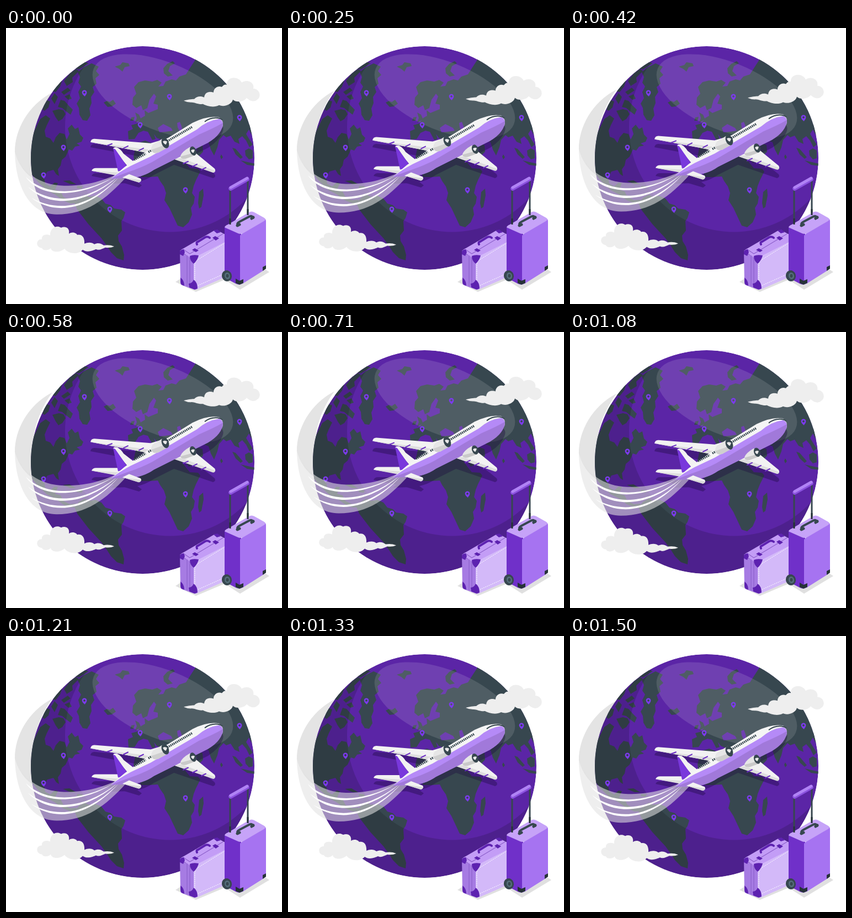
An HTML page for the animation above (1540 ms loop, 500x500 px).

```html
<!DOCTYPE html>
<html lang="en">
<head>
<meta charset="utf-8">
<title>Flight around the globe</title>
<style>
html, body { margin: 0; width: 100%; height: 100%; overflow: hidden; background: #fff; }
svg { display: block; width: 100vw; height: 100vh; }
</style>
</head>
<body>
<svg viewBox="0 0 500 500">
<defs>
  <clipPath id="ball"><circle cx="247.5" cy="235.5" r="202.5"/></clipPath>
  <path id="pin" fill-rule="evenodd" d="M.8 6C-2 3.6-4.4 1.6-4.4-1.4C-4.4-4-2.4-5.6 0-5.6C2.6-5.6 4.4-3.8 4.4-1.2C4.4 1.6 2.4 3.4.8 6ZM0-3A1.9 1.9 0 1 0 .01-3Z"/>
  <g id="outline">
    <path d="M190 273L215 252L255 223L338 172Q366 158 386 163Q397 168 392 180Q386 195 366 208L268 257Q248 271 222 272Z"/>
    <path d="M153 207Q154 201 160 201L262 209L296 199V212L268 229L238 223Z"/>
    <path d="M302 238L338 224L378 256Q381 261 375 263Z"/>
    <path d="M155 259Q157 254 163 254L216 254L246 276L241 280L208 270Z"/>
  </g>
</defs>

<path class="float" fill="#e4e4e4" d="M84 117C40 140 16 184 16 225C22 246 35 266 52 274C42 212 50 164 84 117Z"/>

<g clip-path="url(#ball)">
  <circle cx="247.5" cy="235.5" r="202.5" fill="#5b25a6"/>
  <g fill="#37474f">
    <!-- North America -->
    <path d="M40 214L52 185L62 165L72 158L80 164L74 176L70 186L72 197L80 200L86 208L90 198L97 190L106 192L110 202L115 192L112 182L119 175L125 183L131 180L134 193L140 199L137 206L128 209L134 213L125 215L120 222L114 220L108 233L101 239L99 249L94 256L96 268L91 265L86 257L75 260L69 270L71 282L80 287L88 280L94 281L89 293L99 296L104 306L116 312L127 311L129 317L117 318L103 312L88 301L74 294L58 279L44 262Z"/>
    <path d="M66 148L72 130L80 133L77 144L70 150ZM82 128L88 118L94 125L88 138ZM94 143L99 130L106 132L114 141L121 148L117 157L109 151L102 145ZM82 114L94 98L102 94L98 106L90 116ZM100 116L112 108L117 113L105 121ZM105 96L116 82L127 74L132 78L120 90L121 98L110 105ZM84 150L96 147L104 149L108 156L102 165L95 169L90 162ZM106 124L115 120L119 128L113 130ZM122 72L140 61L150 64L132 75Z"/>
    <path d="M103 277L115 276L127 283L117 283ZM129 286L139 287L137 291L128 290Z"/>
    <!-- Greenland, Iceland, Svalbard -->
    <path d="M130 80L141 71L155 64L168 70L163 78L169 85L162 91L164 101L157 107L160 116L154 125L155 136L151 146L153 158L147 168L139 167L133 157L132 145L128 137L134 127L131 116L136 106L131 99L134 89Z"/>
    <path d="M177 135L183 132L188 134L194 130L199 137L192 142L184 143Z"/>
    <path d="M197 70L207 67L211 62L222 64L224 69L215 71L211 79L205 74Z"/>
    <!-- South America -->
    <path d="M124 317L133 307L143 302L150 306L162 304L173 309L180 318L190 321L196 327L209 329L216 334L213 344L209 350L210 367L203 376L204 386L210 396L214 411L213 421L201 417L190 406L183 395L173 381L160 367L149 355L139 342L129 329Z"/>
    <!-- Europe and Asia -->
    <path d="M232 107L240 98L252 95L265 97L274 94L282 99L276 106L285 105L289 97L300 93L308 95L314 88L326 84L333 73L344 56L360 60L425 125L456 185L446 195L440 184L435 192L441 202L447 211L441 216L435 204L428 196L421 201L423 210L414 206L407 195L399 198L394 194L386 203L383 216L377 231L371 220L367 207L357 203L348 199L344 208L356 212L357 224L344 238L331 244L322 230L311 213L302 200L285 204L273 199L268 192L271 201L265 203L257 188L249 186L240 190L233 201L222 202L221 187L230 183L227 176L238 173L245 163L252 159L251 149L258 154L265 151L275 147L275 139L267 137L272 124L268 119L260 130L256 145L248 149L245 140L236 145L229 139L230 126L236 119Z"/>
    <path d="M286 82L285 73L292 65L302 60L306 64L297 69L294 78L302 86L293 88ZM234 153L241 157L245 166L234 171L237 163ZM227 162L233 161L231 168L225 168Z"/>
    <!-- Africa -->
    <path d="M236 209L252 204L268 210L285 214L301 216L314 228L324 243L333 254L348 255L352 260L344 276L340 286L337 299L342 306L340 318L335 326L337 338L331 352L321 361L311 358L304 343L296 326L287 312L290 299L286 287L279 277L275 269L259 270L245 270L236 252L231 233Z"/>
    <path d="M350 297L357 291L358 303L354 324L350 327L348 317Z"/>
    <!-- South-east islands -->
    <path d="M410 217L416 219L429 234L425 237L416 229ZM425 240L438 243L452 246V250L437 248ZM433 222L440 218L447 222L447 236L440 238L434 231ZM390 229L393 234L390 238L388 233ZM437 177L443 174L446 183L441 184Z"/>
  </g>
  <path fill="#5b25a6" d="M275 181L285 174L299 181L302 186L289 188L278 189ZM310 172L315 170L318 178L320 187L315 188L311 180ZM330 207L340 213L347 222L341 221L333 214Z"/>
  <path fill="#000" opacity=".15" fill-rule="evenodd" d="M0 0H500V500H0ZM107 179.5A190 190 0 0 0 487 179.5A190 190 0 0 0 107 179.5Z"/>
  <ellipse cx="284" cy="124" rx="135" ry="62" transform="rotate(22 284 124)" fill="#fff" opacity=".12"/>
  <use href="#outline" y="9" fill="#1d0b3f" opacity=".38"/>
</g>

<g id="pins" fill="#7c3aed"></g>

<g class="float">
  <path fill="#e2e2e2" opacity=".57" d="M16 225C17 282 40 338 92 338C145 338 180 312 218 270L205 264C170 279 145 286 105 286C62 285 28 262 16 225Z"/>
  <g fill="#fff">
    <path d="M36 270C60 307 130 311 196 270C130 306 70 303 36 270Z"/>
    <path d="M40 288C75 325 142 324 202 270C140 319 82 319 40 288Z"/>
    <path d="M46 308C85 338 147 335 204 271C146 329 92 333 46 308Z"/>
  </g>
</g>

<g class="float">
  <!-- far wing -->
  <path fill="#f2f2f2" d="M153 207Q154 201 160 201L262 209L296 199V214L268 229L238 223Z"/>
  <path fill="#dedede" d="M153 207L240 218L268 222V229L238 223Z"/>
  <path stroke="#6a2bc4" stroke-width="2" stroke-linecap="round" d="M184 213L192 210M213 218L221 214M241 222L249 218"/>
  <!-- tail -->
  <path fill="#f2f2f2" d="M155 259Q157 254 163 254L216 254L226 264L203 267Z"/>
  <path fill="#dedede" d="M155 259L205 262L216 267L203 268Z"/>
  <path fill="#f2f2f2" d="M194 219Q195 215 202 217Q209 221 213 228L231 242L224 255Z"/>
  <path fill="#7938dc" d="M194 218L198 220L216 246L222 256L203 260Z"/>
  <!-- near wing -->
  <path fill="#f2f2f2" d="M302 237L339 223L378 255Q381 260 376 262Z"/>
  <path fill="#dedede" d="M302 237L318 236L379 259Q378 263 374 262Z"/>
  <path stroke="#6a2bc4" stroke-width="2" stroke-linecap="round" d="M321 246L330 242M338 251L346 247M354 257L362 253"/>
  <!-- fuselage -->
  <path fill="#f5f5f5" d="M190 273L215 252L255 223L338 172Q366 158 386 162Q395 167 392 180L268 250L222 270Z"/>
  <path fill="#b58af7" d="M190 273Q207 260 226 250L262 233L346 184Q364 168 386 165Q395 168 392 180Q386 195 366 208L268 257Q248 271 222 272Z"/>
  <path fill="#a179da" d="M190 273L222 261Q246 253 265 243L350 193Q380 180 393 172Q392 193 366 208L268 257Q248 271 222 272Z"/>
  <path fill="none" stroke="#37474f" stroke-width="2" d="M360 170Q369 163 380 163Q388 163 392 167"/>
  <path stroke="#37474f" stroke-width="4" stroke-dasharray="2 1.3" d="M232 239L253 228M258 225L338 179"/>
  <path fill="#f2f2f2" d="M211 271L223 265L244 273Q247 277 241 280Z"/>
  <path fill="#d9d9d9" d="M211 271L245 276Q244 280 240 280Z"/>
  <!-- engines -->
  <path fill="#e6e6e6" d="M263 220Q263 211 272 208L286 199L293 216L276 226Q265 230 263 220Z"/>
  <path fill="#cfcfcf" d="M263 221L291 211L293 217L276 226Q266 229 263 221Z"/>
  <ellipse cx="288.5" cy="208.5" rx="6.3" ry="10" transform="rotate(-22 288.5 208.5)" fill="#37474f"/>
  <path fill="#e8e8e8" d="M284 206Q287 203 292 206L290 211Q287 212 284 206Z"/>
  <path fill="#e6e6e6" d="M316 232Q319 224 333 216L343 231L326 237Q316 239 316 232Z"/>
  <path fill="#c9c9c9" d="M316 233L342 226V231L326 237Q317 238 316 233Z"/>
  <ellipse cx="339" cy="223" rx="5.6" ry="8.5" transform="rotate(-22 339 223)" fill="#37474f"/>
  <path fill="#e8e8e8" d="M335 222Q338 219 342 221L340 226Q337 227 335 222Z"/>
</g>

<g class="float" fill="#eee">
  <path d="M322 132C328 130 336 129 341 129C345 124 353 123 359 126C360 117 367 114 376 117C376 109 384 104 391 107C394 103 397 102 400 103C399 88 421 86 427 99C437 92 451 99 448 110C461 111 463 126 455 130C449 136 440 131 436 127C431 134 417 136 411 130C409 139 395 144 386 140C377 145 364 142 357 138C347 139 341 134 335 135Q328 135 322 132Z"/>
  <path d="M196 396C190 393 182 393 177 394C172 390 166 389 160 392C156 388 148 388 142 391C143 379 137 373 129 375C127 371 119 369 114 373C116 361 106 359 100 362C90 356 79 364 80 376C70 372 64 377 65 383C55 382 52 397 65 399C68 405 78 403 81 399C83 408 99 407 106 400C112 409 130 412 139 402C147 408 158 403 163 401C168 404 175 400 180 398Q190 399 196 396Z"/>
</g>

<g stroke-linejoin="round">
  <path fill="#e0e0e0" d="M307 460L318 453L455 428L477 442L424 474L396 456L344 478Z"/>
  <!-- small case -->
  <path fill="#a67be3" d="M315 406L333 414L341 420V474L319 466Q316 465 316 460Z"/>
  <path fill="#d3b9f9" d="M340 416L390 378H400V450L345 474Q340 475 340 470Z"/>
  <path fill="#c39df6" d="M315 404Q317 401 322 399L377 367Q381 365 386 368L400 376V386L341 416Q336 418 331 414Z"/>
  <path fill="none" stroke="#8e62cc" stroke-width="1.2" d="M321 401L333 409L393 373M328 412V468M333 416V469"/>
  <path fill="none" stroke="#fff" stroke-dasharray="2 1.5" d="M397 389L347 420Q342 424 342 430V469L396 445"/>
  <g fill="#5d22b0">
    <path d="M315 405Q317 401 322 401L324 406L321 413L315 410ZM333 413Q339 410 349 412Q347 421 340 427Q333 422 333 413ZM316 452Q323 457 323 467L318 465Q316 463 316 460ZM331 463Q337 463 340 456Q347 461 347 472L342 474L332 470ZM376 367L383 365L389 370L382 372Z"/>
    <path d="M337 402L342 399L349 403L344 406ZM374 380L379 377L386 381L380 385Z"/>
  </g>
  <path fill="none" stroke="#5d22b0" stroke-width="4" stroke-linecap="round" d="M346 392Q344 388 348 387L361 379Q365 377 369 380"/>
  <!-- big case -->
  <path fill="none" stroke="#37474f" stroke-width="3" d="M406 290V357M438 274V340"/>
  <path fill="#7030c9" d="M396 361L426 371V464Q421 466 416 463L399 454Q396 452 396 448Z"/>
  <path fill="#a673f1" d="M424 376L458 345H468Q471 346 471 350V432Q471 436 467 439L429 463Q424 466 424 461Z"/>
  <path fill="#c6a3f8" d="M396 361Q397 358 402 356L440 334Q445 331 450 334L468 344Q472 347 467 350L431 371Q425 375 418 371L400 363Q397 362 396 361Z"/>
  <path fill="none" stroke="#263238" stroke-width="3" d="M406 345V356M438 328V339"/>
  <path fill="none" stroke="#37474f" stroke-width="4" stroke-linecap="round" d="M420 358Q417 354 423 351L440 342Q445 339 448 344"/>
  <path stroke="#37474f" stroke-width="5" stroke-linecap="round" d="M419 358L423 356M445 345L448 343"/>
  <path stroke="#8b52df" stroke-width="7.5" stroke-linecap="round" d="M407 291L437 274"/>
  <path stroke="#b083f5" stroke-width="5" stroke-linecap="round" d="M407 289L437 272"/>
  <path fill="#263238" d="M416 454L423 458L430 455V462L423 465L416 462ZM465 433L471 430V436L465 440Z"/>
  <ellipse cx="400" cy="449" rx="9" ry="10" transform="rotate(-18 400 449)" fill="#37474f"/>
  <ellipse cx="401" cy="449" rx="5" ry="6" transform="rotate(-18 401 449)" fill="#546e7a"/>
  <ellipse cx="401" cy="449" rx="2.5" ry="3.2" fill="#37474f"/>
</g>
</svg>
<script>
const LOOP = 1540, STEPS = 37, RISE = 10, LEAD = 40;
const floats = document.querySelectorAll('.float');
const spots = [[142, 118], [296, 125], [104, 217], [68, 267], [188, 329], [325, 294], [243, 176], [423, 163]];

document.getElementById('pins').innerHTML = spots
  .map(([x, y]) => `<use href="#pin" x="${x}" y="${y}"/>`).join('');

// Triangle wave: steady rise, then steady fall.
function lift(ms) {
  const step = Math.floor(ms / LOOP * STEPS + 0.1);
  const p = (step / STEPS + LEAD / LOOP) % 1;
  return RISE * (1 - Math.abs(1 - 2 * p));
}

function draw(now) {
  // artwork is posed slightly above its lowest point
  const y = 0.3 - lift(now % LOOP);
  floats.forEach(el => el.setAttribute('transform', `translate(0 ${y.toFixed(2)})`));
}

const start = performance.now();
function tick() {
  draw(performance.now() - start);
  requestAnimationFrame(tick);
}
tick();
</script>
</body>
</html>
```
